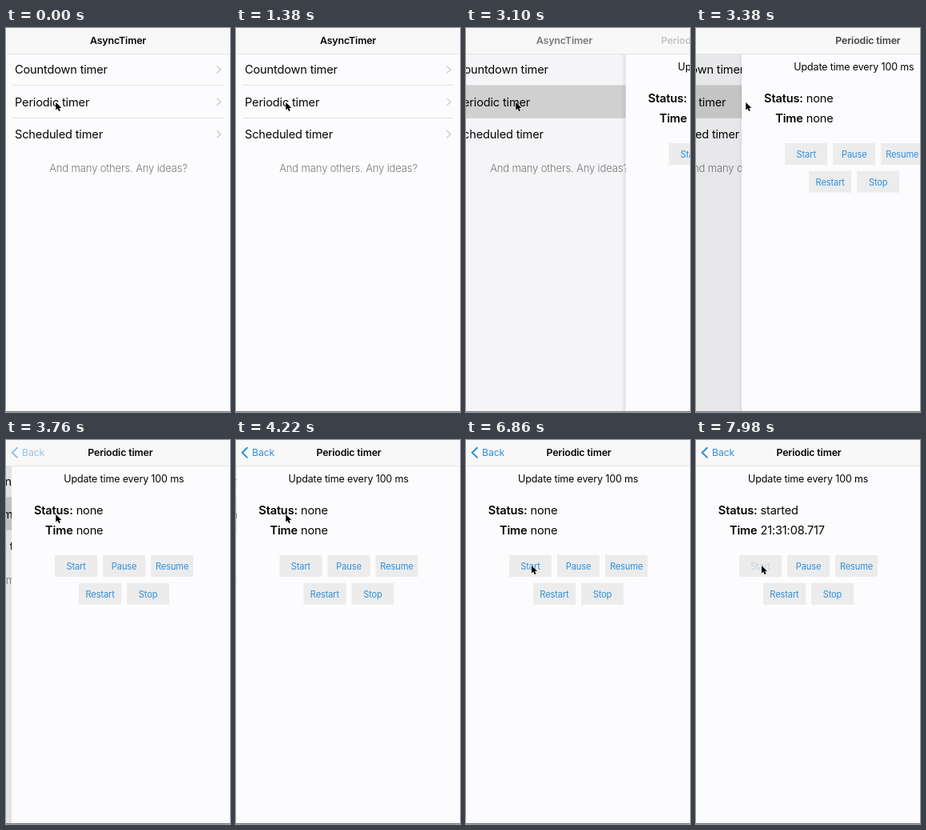
An HTML page that plays this animation: 280 by 480 pixels, repeating every 8000 ms.

```html
<!DOCTYPE html>
<html lang="en">
<head>
<meta charset="utf-8">
<title>AsyncTimer</title>
<style>
  html, body { margin: 0; width: 100%; height: 100%; overflow: hidden; background: #fcfcff; }
  svg { display: block; width: 100vw; height: 100vh; }
  text { font: 400 14.6px Inter, Roboto, sans-serif; letter-spacing: -.012em; fill: #050505; }
  .title { font-size: 12.4px; font-weight: 600; text-anchor: middle; }
  .label { font-weight: 600; text-anchor: end; }
  .note { font-size: 12.5px; text-anchor: middle; }
  .hint { font-size: 13.05px; font-weight: 300; text-anchor: middle; fill: #7a7a7a; }
  .btn text { font-size: 11.1px; text-anchor: middle; fill: #2f8fdc; }
  .btn rect { fill: #ececec; }
  .line { fill: #e4e4e6; }
  .arrow { fill: none; stroke: #c8c8c8; stroke-width: 1.3; }
</style>
</head>
<body>
<svg viewBox="0 0 280 480">
  <defs>
    <linearGradient id="fade">
      <stop offset="0" stop-color="#000" stop-opacity="0"/>
      <stop offset="1" stop-color="#000" stop-opacity=".08"/>
    </linearGradient>
  </defs>
  <rect width="280" height="480" fill="#fcfcff"/>
  <g id="list">
    <g id="rows"></g>
    <text class="hint" x="140.5" y="180">And many others. Any ideas?</text>
  </g>
  <rect id="dim" width="280" height="480"/>
  <g id="page">
    <rect id="shadow" x="-6" y="33" width="6" height="447" fill="url(#fade)"/>
    <rect width="280" height="480" fill="#fcfcff"/>
    <text class="note" x="140.2" y="53">Update time every 100 ms</text>
    <text class="label" x="76.5" y="93">Status:</text>
    <text id="status" x="80.5" y="93"></text>
    <text class="label" x="76.5" y="118">Time</text>
    <text id="time" x="80.5" y="118"></text>
    <g id="buttons"></g>
  </g>
  <rect width="280" height="32" fill="#f8f8f9"/>
  <rect class="line" y="32" width="280" height="1"/>
  <text id="oldTitle" class="title" y="20">AsyncTimer</text>
  <text id="newTitle" class="title" y="20">Periodic timer</text>
  <g id="back">
    <path d="M14.4 9.2L7.7 15.8L14.4 22.4" fill="none" stroke="#2f8fd8" stroke-width="2"/>
    <text x="20" y="20" style="font-size:12.3px;fill:#2f8fd8">Back</text>
  </g>
  <rect y="479" width="280" height="1" fill="#777"/>
  <path id="cursor" d="M0 0V9.6L2.2 7.6L3.8 11L5.5 10.2L4 7H7Z" fill="#000" stroke="#f4f4f4" stroke-width=".8" paint-order="stroke"/>
</svg>
<script>
const LOOP = 8000, PRESS_ROW = 2840, PUSH = 2945, PRESS_START = 7790, STARTED = 7900;
const $ = id => document.getElementById(id);
const clamp = v => Math.min(1, Math.max(0, v));
const ramp = (t, a, b) => clamp((t - a) / (b - a));
const smooth = u => u * u * (3 - 2 * u);
const mix = (a, b, p) => a + (b - a) * p;
const move = (id, x, y = 0) => $(id).setAttribute('transform', `translate(${x.toFixed(2)} ${y.toFixed(2)})`);
const opacity = (id, v) => $(id).setAttribute('opacity', v.toFixed(3));

const lines = [71, 112].map(y => `<rect class="line" x="8" y="${y}" width="264" height="1"/>`).join('');
const highlight = '<rect id="row" y="72" width="285" height="40.5" fill="#d6d6d7"/>';
$('rows').innerHTML = lines + highlight + ['Countdown', 'Periodic', 'Scheduled'].map((name, i) => {
  const y = 52 + i * 40.4;
  return `<text x="11" y="${y + 5.2}">${name} timer</text>
    <path class="arrow" d="M263.5 ${y - 4.5}l4.8 4.5l-4.8 4.5"/>`;
}).join('');

const button = (name, x, y) => `<g class="btn"><rect x="${x}" y="${y}" width="53" height="27"/>
  <text id="${name}" x="${x + 26.5}" y="${y + 17.8}">${name}</text></g>`;
$('buttons').innerHTML =
  ['Start', 'Pause', 'Resume'].map((n, i) => button(n, 54 + i * 60, 144)).join('') +
  ['Restart', 'Stop'].map((n, i) => button(n, 84 + i * 60, 178.7)).join('');

function draw(t) {
  // critically damped push of the new page
  const s = Math.max(0, t - PUSH) * 0.0068;
  const left = (1 + s) * Math.exp(-s), p = 1 - left;
  move('page', 280 * left);
  opacity('shadow', clamp(left * 3));
  $('page').style.display = t < PUSH ? 'none' : '';
  move('list', -84 * p);
  opacity('dim', .1 * p);
  opacity('row', t < PRESS_ROW ? 0 : 1);

  // navigation bar
  const u = ramp(t, 2855, 3820), q = smooth(u);
  move('oldTitle', 140 - 106 * q);
  opacity('oldTitle', clamp(1 - 1.9 * u));
  move('newTitle', 141 + 171 * (1 - q));
  opacity('newTitle', clamp(q * 1.3));
  opacity('back', ramp(t, 3500, 4020));

  const c = smooth(ramp(t, 5360, 6200));
  move('cursor', mix(62.3, 82, c), mix(93, 157, c));

  const on = t >= STARTED;
  $('status').textContent = on ? 'started' : 'none';
  $('time').textContent = on ? '21:31:08.717' : 'none';
  opacity('Start', t < PRESS_START ? 1 : .25);
}

const begin = performance.now();
function tick() {
  draw((performance.now() - begin) % LOOP);
  requestAnimationFrame(tick);
}
tick();
</script>
</body>
</html>
```
